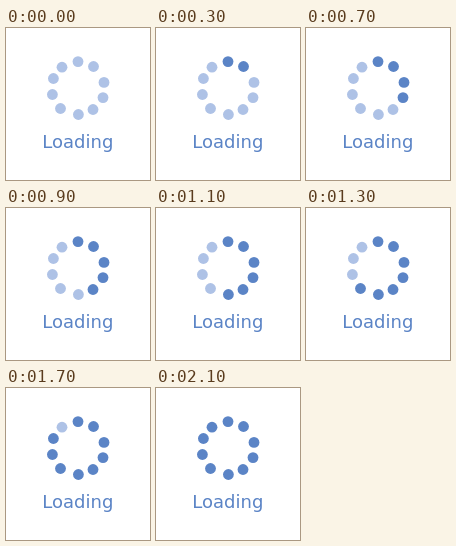
Animation, 144 px wide and 152 px high, one loop 2200 ms. Source, as an HTML page:

```html
<!DOCTYPE html>
<html lang="en">
<head>
<meta charset="utf-8">
<title>Loading</title>
<style>
  html, body { margin: 0; width: 100%; height: 100%; overflow: hidden; background: #fff; }
  svg { display: block; width: 144px; height: 152px; }
  text { font: 18px "DejaVu Sans", sans-serif; fill: #5b84c6; }
</style>
</head>
<body>
<svg viewBox="0 0 144 152">
  <g id="ring"></g>
  <text x="36.3" y="120">Loading</text>
</svg>
<script>
const LOOP = 2200, FIRST = 100, STEP = 200;
const LIGHT = "#aec2e6", DARK = "#5b84c6";

// Dot centres, clockwise from the top
const centres = [
  [72, 33.6], [87.5, 38.5], [98, 54.4], [97, 69.6], [87, 81.5],
  [72.4, 86.5], [54.5, 80.5], [46.4, 66.5], [47.4, 50.5], [56, 39.2]
];

const ring = document.getElementById("ring");
const dots = centres.map(([cx, cy]) => {
  const dot = document.createElementNS("http://www.w3.org/2000/svg", "circle");
  dot.setAttribute("cx", cx);
  dot.setAttribute("cy", cy);
  dot.setAttribute("r", 5.4);
  return ring.appendChild(dot);
});

function draw(time) {
  const t = time % LOOP;
  dots.forEach((dot, i) => {
    dot.setAttribute("fill", t >= FIRST + i * STEP ? DARK : LIGHT);
  });
}

let start = null;
function tick(now) {
  if (start === null) start = now;
  draw(now - start);
  requestAnimationFrame(tick);
}
draw(0);
requestAnimationFrame(tick);
</script>
</body>
</html>
```
